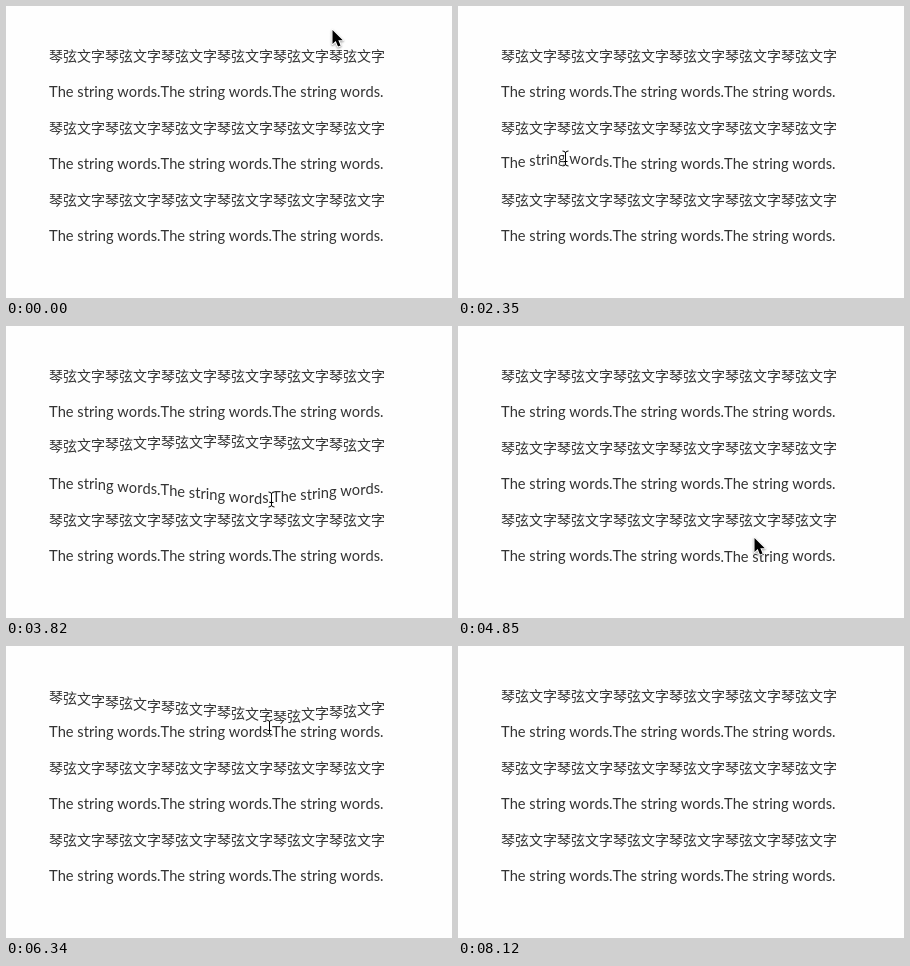
Animation of 446x292 px, one loop 8860 ms. Source, as an HTML page with a canvas:

```html
<!DOCTYPE html>
<html lang="en">
<head>
<meta charset="utf-8">
<title>String words</title>
<style>
  html, body { margin: 0; width: 100%; height: 100%; overflow: hidden; background: #fefefe; }
  canvas { display: block; width: 446px; height: 292px; }
</style>
</head>
<body>
<canvas id="stage" width="446" height="292"></canvas>
<script>
const ctx = document.getElementById('stage').getContext('2d');
const LOOP = 8860, TICK = 147.4, LAST_TICK = 55;
const LEFT = 43, RIGHT = 379, TOP = 50, ROW_GAP = 36, ROW_COUNT = 6;
const HOLD = 18, MAX_PULL = 21, FALLOFF = 0.09;
const HAN = { text: '琴弦文字'.repeat(6), font: '14px "Noto Sans CJK SC", "Noto Sans CJK", sans-serif' };
const LATIN = { text: 'The string words.'.repeat(3), font: '14.67px Lato, sans-serif' };

// Turning points of the cursor: tick, x, y
const PATH = [
  [0, 326, 24], [4, 232, 105], [8, 161, 173], [10.5, 130, 267], [13, 112, 172], [16, 107, 152],
  [19, 104, 14], [26, 265, 173], [28.5, 287, 264], [30, 300, 208], [33, 296, 212],
  [39, 322, 3], [40.5, 322, 3], [43, 263, 81], [47, 165, 233], [50, 225, 297],
  [52, 253, 289], [54, 401, 290], [55, 420, 297]
];

const limitPull = dy => Math.max(-MAX_PULL, Math.min(MAX_PULL, dy));

function cursorAt(tick) {
  const i = Math.max(1, PATH.findIndex(p => p[0] >= tick));
  const [t0, x0, y0] = PATH[i - 1], [t1, x1, y1] = PATH[i];
  const k = (tick - t0) / (t1 - t0);
  return { x: x0 + (x1 - x0) * k, y: y0 + (y1 - y0) * k };
}

// A string is caught when the cursor crosses it and let go once the cursor is HOLD away.
function findPlucks(rowY) {
  const plucks = [];
  let held = null, before = cursorAt(0).y - rowY;
  for (let tick = 0.5; tick <= LAST_TICK; tick += 0.5) {
    const { x, y } = cursorAt(tick);
    const dy = y - rowY;
    if (!held && before * dy <= 0) {
      held = { x, grab: tick, release: Infinity };
      plucks.push(held);
    }
    if (held && Math.abs(dy) >= HOLD) {
      held.release = tick;
      held.pull = limitPull(dy);
      held = null;
    }
    before = dy;
  }
  return plucks;
}

function layOut({ text, font }) {
  ctx.font = font;
  let x = LEFT;
  return [...text].map(char => {
    const width = ctx.measureText(char).width;
    const glyph = { char, x, mid: x + width / 2 };
    x += width;
    return glyph;
  });
}

const rows = Array.from({ length: ROW_COUNT }, (_, i) => {
  const style = i % 2 ? LATIN : HAN;
  const y = TOP + i * ROW_GAP;
  return { y, font: style.font, glyphs: layOut(style), plucks: findPlucks(y) };
});

// Current pull and swing of each string touched so far
function activePlucks({ y, plucks }, tick) {
  return plucks.filter(p => p.grab <= tick).map(({ x, release, pull }) => {
    if (tick < release) return { x, pull: limitPull(cursorAt(tick).y - y), swing: 1 };
    const since = tick - release;
    return { x, pull, swing: Math.exp(-0.95 * since) * Math.cos(2.7 * since) };
  });
}

function offset(active, x) {
  return active.reduce((sum, p) => {
    const reach = Math.max(0, Math.abs(p.pull) - FALLOFF * Math.abs(x - p.x));
    return sum + Math.sign(p.pull) * reach * p.swing;
  }, 0);
}

function drawArrow() {
  ctx.beginPath();
  [[0.5, 0], [0.5, 14], [3.7, 11], [6, 16.5], [8.6, 15.4], [6.3, 10.2], [10.8, 10.2]]
    .forEach(p => ctx.lineTo(...p));
  ctx.closePath();
  ctx.lineJoin = 'round';
  ctx.lineWidth = 2;
  ctx.strokeStyle = '#fff';
  ctx.shadowColor = 'rgba(0,0,0,.4)';
  ctx.shadowBlur = 2;
  ctx.shadowOffsetY = 1;
  ctx.stroke();
  ctx.shadowColor = 'transparent';
  ctx.fillStyle = '#000';
  ctx.fill();
}

function drawBeam() {
  ctx.translate(0.5, 0.5);
  ctx.beginPath();
  for (const s of [-1, 1]) {
    ctx.moveTo(-3, 7.5 * s);
    ctx.quadraticCurveTo(0, 7.5 * s, 0, 5.5 * s);
    ctx.quadraticCurveTo(0, 7.5 * s, 3, 7.5 * s);
  }
  ctx.moveTo(0, -6);
  ctx.lineTo(0, 6);
  ctx.moveTo(-2, 3);
  ctx.lineTo(2, 3);
  for (const [color, width] of [['rgba(255,255,255,.8)', 3], ['#000', 1]]) {
    ctx.strokeStyle = color;
    ctx.lineWidth = width;
    ctx.stroke();
  }
}

function drawCursor({ x, y }) {
  const overText = x >= LEFT && x <= RIGHT && rows.some(row => Math.abs(y - row.y) < HOLD - 1);
  ctx.save();
  ctx.translate(Math.round(x), Math.round(y));
  (overText ? drawBeam : drawArrow)();
  ctx.restore();
}

function draw(tick) {
  ctx.fillStyle = '#fefefe';
  ctx.fillRect(0, 0, 446, 292);
  ctx.fillStyle = '#333';
  for (const row of rows) {
    const active = activePlucks(row, tick);
    ctx.font = row.font;
    for (const g of row.glyphs) {
      ctx.fillText(g.char, g.x, row.y + 5 + Math.round(offset(active, g.mid)));
    }
  }
  drawCursor(cursorAt(tick));
}

const start = performance.now();
function frame() {
  const time = (performance.now() - start) % LOOP;
  draw(Math.min(LAST_TICK, Math.floor((time + 15) / TICK)));
  requestAnimationFrame(frame);
}
frame();
</script>
</body>
</html>
```
